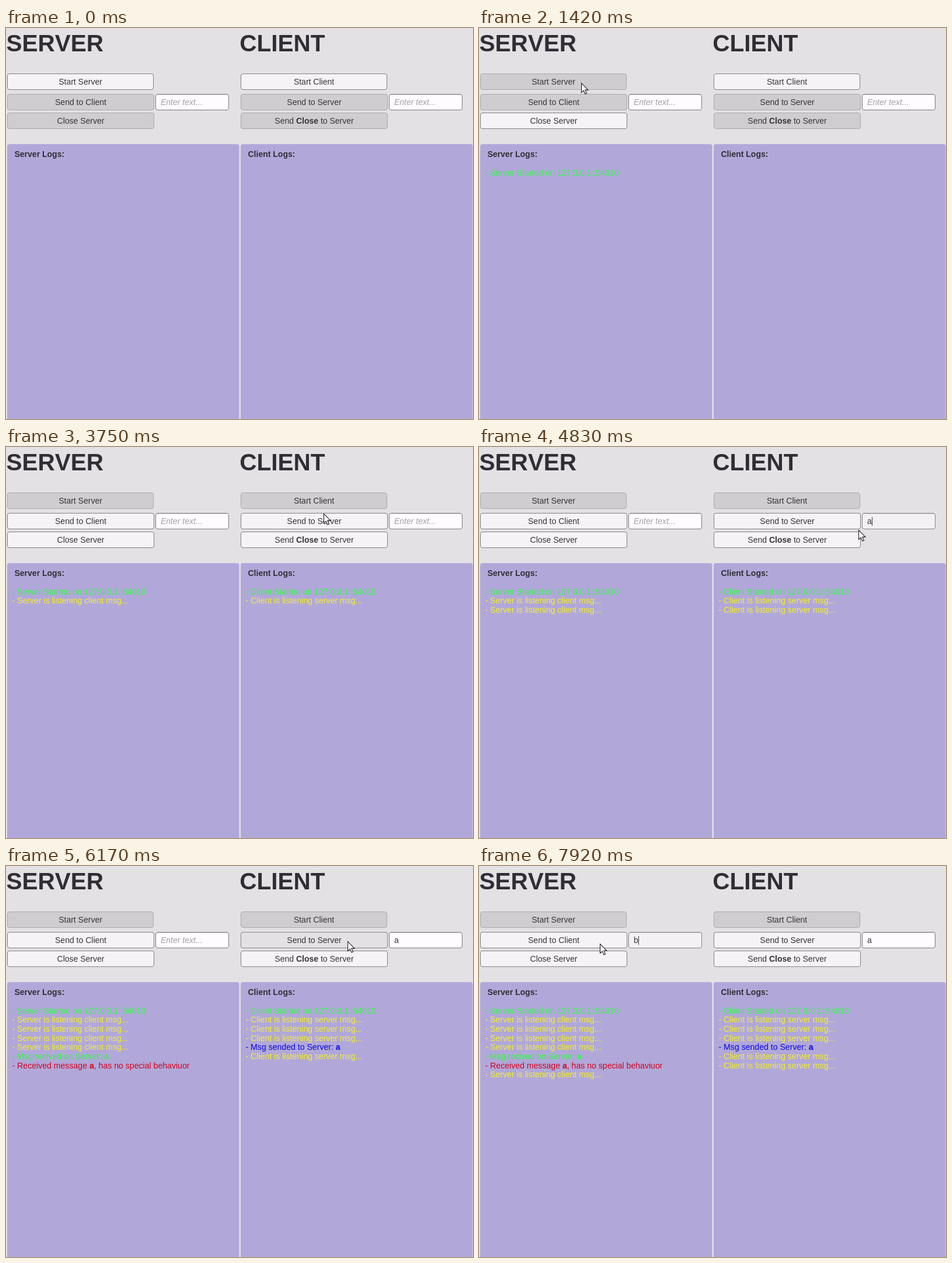
These frames come from a looping animation (800 by 670 pixels, 8000 ms). An HTML page with a canvas:

```html
<!DOCTYPE html>
<html lang="en">
<head>
<meta charset="utf-8">
<title>Server and client</title>
<style>
  html, body { margin: 0; width: 100%; height: 100%; overflow: hidden; background: #e3e1e4; }
  canvas { display: block; }
</style>
</head>
<body>
<canvas id="stage" width="800" height="670"></canvas>
<script>
const ctx = document.getElementById('stage').getContext('2d');
const LOOP = 8000, STEP = 1000 / 12;
const FAMILY = '"Liberation Sans", Arial, sans-serif';
const INK = '#363439', DARK = '#302e34', BACK = '#e3e1e4', PANEL = '#b1a8d9';
const GREEN = '#30fa46', YELLOW = '#f4ef27', BLUE = '#0c06e0', RED = '#d4021e';

// Moments of the session
const SERVER_UP = 1330, CONNECTED = 3080, POLL = 1000;
const CLIENT_FOCUS = 4500, CLIENT_TYPED = 4750, CLIENT_SENT = 5420, RECEIVED = 6170;
const SERVER_FOCUS = 7000, SERVER_TYPED = 7420;

// Looks: fill and border grey
const look = (fill, border) => ({ fill, border });
const NORMAL = look(245, 128), DISABLED = look(207, 170), PRESSED = look(225, 134);
const SELECTED = look(236, 130), FIELD = look(254, 122), FOCUSED = look(243, 132);

// Pointer glides, each from where the last one ended
const glide = (start, end, x, y) => ({ start, end, x, y });
const GLIDES = [
  glide(80, 250, 441, 391),
  glide(330, 830, 100, 36),
  glide(830, 1000, 175, 94),
  glide(2085, 2500, 527, 97),
  glide(3660, 3750, 544, 114),
  glide(3750, 4420, 692, 127),
  glide(4660, 4830, 650, 142),
  glide(4830, 5330, 585, 129),
  glide(RECEIVED, 6580, 268, 138),
  glide(6840, SERVER_FOCUS, 296, 130),
  glide(7500, 7920, 207, 133)
];

const clamp = v => Math.max(0, Math.min(1, v));
const mix = (a, b, p) => a + (b - a) * p;
const ease = p => p * p * (3 - 2 * p);
const font = (size, style = '') => `${style} ${size}px ${FAMILY}`;
const tone = v => `rgb(${v},${v - 2},${Math.min(255, v + 1)})`;

function label(text, x, y, fontSpec, color) {
  ctx.font = fontSpec;
  ctx.fillStyle = color;
  ctx.fillText(text, x, y);
}

// Text between asterisks is bold.
function rich(text, x, y, color, size, centered) {
  const parts = text.split('*').map((s, i) => {
    const f = ctx.font = font(size, i % 2 ? 'bold' : '');
    return { s, f, w: ctx.measureText(s).width };
  });
  if (centered) x -= parts.reduce((sum, p) => sum + p.w, 0) / 2;
  for (const p of parts) {
    label(p.s, x, y, p.f, color);
    x += p.w;
  }
}

function box(x, y, w, h, { fill, border }) {
  ctx.beginPath();
  ctx.roundRect(x + .5, y + .5, w - 1, h - 1, 3.5);
  ctx.fillStyle = tone(fill);
  ctx.fill();
  ctx.strokeStyle = tone(border);
  ctx.lineWidth = 1;
  ctx.stroke();
}

// Fades through looks, each taking a tenth of a second to come in.
function fade(t, first, ...changes) {
  return changes.reduce((now, [start, next]) => {
    const p = clamp((t - start + 20) / 100);
    return look(Math.round(mix(now.fill, next.fill, p)), Math.round(mix(now.border, next.border, p)));
  }, first);
}

function button(text, x, y, w, style) {
  box(x, y, w, 28, style);
  rich(text, x + w / 2, y + 19, INK, 14, true);
}

function field(x, t, text, focus, typed, blur) {
  const filled = t >= typed;
  box(x, 113, 126, 28, fade(t, FIELD, [focus, FOCUSED], [blur, FIELD]));
  ctx.fillStyle = 'rgba(70,68,72,.2)';
  ctx.fillRect(x + 3, 114, 120, 1);
  if (filled) label(text, x + 9, 132, font(14), INK);
  else label('Enter text...', x + 9, 132, font(14, 'italic'), '#a3a1a6');
  if (t >= focus && t < blur) {
    const w = filled ? ctx.measureText(text).width : 0;
    ctx.fillStyle = INK;
    ctx.fillRect(Math.round(x + 9 + w), 120, 1, 15);
  }
}

// A start line, one polling line a second, and other lines slotted in by time.
function logLines(t, name, peer, started, extra) {
  const lines = [{ at: started, color: GREEN, text: `- ${name} Started on 127.0.0.1::54010` }];
  for (let at = CONNECTED + 90; at < LOOP; at += POLL) {
    lines.push({ at, color: YELLOW, text: `- ${name} is listening ${peer} msg...` });
  }
  return lines.concat(extra).filter(line => t >= line.at).sort((a, b) => a.at - b.at);
}

function panel(x, title, lines) {
  ctx.beginPath();
  ctx.roundRect(x + 2, 199, 397.5, 480, 4);
  ctx.fillStyle = PANEL;
  ctx.fill();
  label(title, x + 14.5, 221, font(14, 'bold'), DARK);
  lines.forEach(({ color, text }, i) => rich(text, x + 10.5, 252.5 + i * 15.68, color, 14.1));
}

function pointer(t) {
  if (t < GLIDES[0].start) return;
  let x = 520, y = 655;
  for (const g of GLIDES) {
    const p = ease(clamp((t - g.start) / (g.end - g.start)));
    x = mix(x, g.x, p);
    y = mix(y, g.y, p);
  }
  ctx.save();
  ctx.translate(Math.round(x) + .5, Math.round(y) + .5);
  ctx.fillStyle = '#fff';
  ctx.strokeStyle = '#1c1b20';
  ctx.lineWidth = 1.1;
  const arrow = new Path2D('M0 0V16L3.7 12.6L6.4 18.6L9 17.5L6.4 11.6H11.4Z');
  ctx.fill(arrow);
  ctx.stroke(arrow);
  ctx.restore();
}

function draw(t) {
  ctx.fillStyle = BACK;
  ctx.fillRect(0, 0, 800, 670);
  ctx.fontKerning = 'none';
  label('SERVER', .5, 39.5, font(40.5, 'bold'), DARK);
  label('CLIENT', 400.3, 39.5, font(40.5, 'bold'), DARK);

  const whenConnected = fade(t, DISABLED, [CONNECTED, NORMAL]);
  button('Start Server', 2, 78, 251, fade(t, NORMAL, [SERVER_UP, DISABLED]));
  button('Send to Client', 2, 113, 252, whenConnected);
  button('Close Server', 2, 145, 252, fade(t, DISABLED, [SERVER_UP, NORMAL]));
  button('Start Client', 402, 78, 251, fade(t, NORMAL, [CONNECTED, DISABLED]));
  button('Send to Server', 402, 113, 252, fade(t, whenConnected,
    [CLIENT_SENT, PRESSED], [RECEIVED, SELECTED], [SERVER_FOCUS, NORMAL]));
  button('Send *Close* to Server', 402, 145, 252, whenConnected);

  field(256, t, 'b', SERVER_FOCUS, SERVER_TYPED, Infinity);
  field(656, t, 'a', CLIENT_FOCUS, CLIENT_TYPED, CLIENT_SENT);

  panel(0, 'Server Logs:', logLines(t, 'Server', 'client', SERVER_UP, [
    { at: RECEIVED, color: GREEN, text: '- Msg recived on Server: *a*' },
    { at: RECEIVED, color: RED, text: '- Received message *a*, has no special behaviuor' }
  ]));
  panel(400, 'Client Logs:', logLines(t, 'Client', 'server', CONNECTED, [
    { at: CLIENT_SENT, color: BLUE, text: '- Msg sended to Server: *a*' }
  ]));
  pointer(t);
}

function tick() {
  const t = performance.now() % LOOP;
  draw(Math.floor((t + 4) / STEP) * STEP % LOOP + 4);
  requestAnimationFrame(tick);
}
tick();
</script>
</body>
</html>
```
